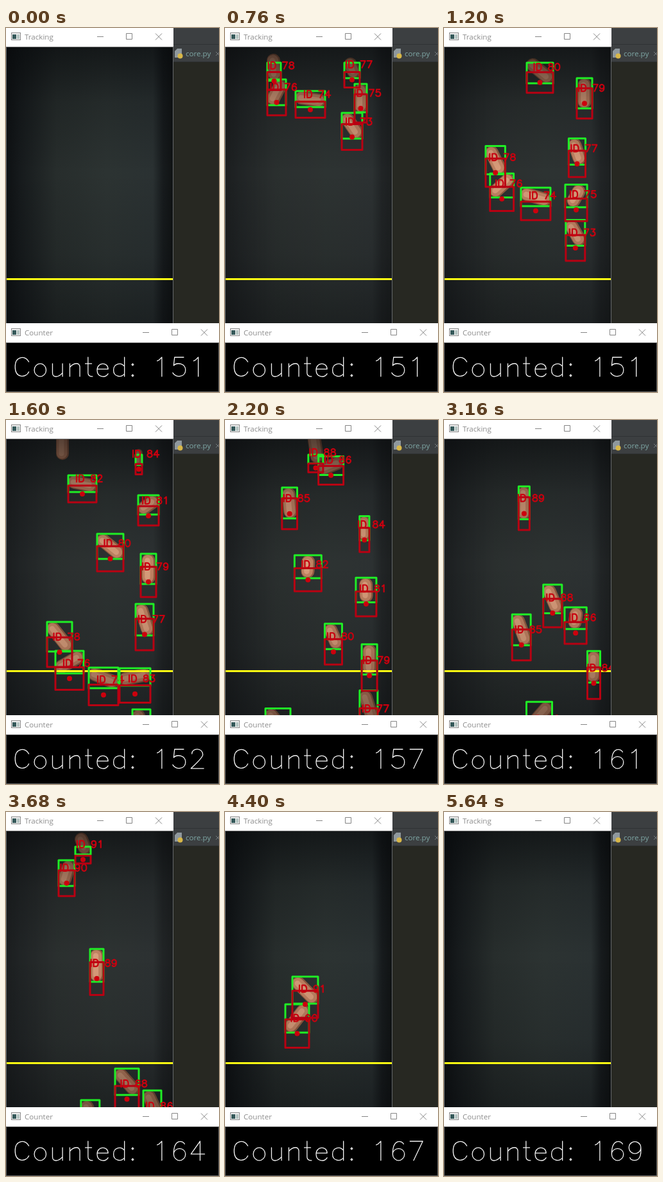
An HTML page for the animation above (5.68 s loop, 332 px wide and 566 px high).

```html
<!DOCTYPE html>
<html lang="en">
<head>
<meta charset="utf-8">
<title>Belt counter</title>
<style>
html, body { margin: 0; width: 100%; height: 100%; overflow: hidden; background: #272822; }
svg { display: block; width: 332px; height: 566px; }
text { font: 11.6px "Open Sans", "Noto Sans", sans-serif; fill: #8c8c8c; }
.stroke path { fill: none; vector-effect: non-scaling-stroke; stroke-linecap: round; stroke-linejoin: round; }
#count path { stroke: #f4f4f4; stroke-width: 1.3; }
#marks path { stroke: #c8000f; stroke-width: 2.2; }
#marks rect { fill: none; stroke-width: 3; stroke-linejoin: round; }
#fingers line { stroke-linecap: round; }
.buttons { fill: none; stroke: #858585; }
</style>
</head>
<body>
<svg viewBox="0 0 332 566">
  <defs>
    <clipPath id="view"><rect x="1" y="30" width="259" height="429"/></clipPath>
    <linearGradient id="across">
      <stop offset="0" stop-color="#0e1113"/>
      <stop offset=".08" stop-color="#161a1c"/>
      <stop offset=".3" stop-color="#272d2c"/>
      <stop offset=".6" stop-color="#2c3332"/>
      <stop offset=".88" stop-color="#2a3132"/>
      <stop offset=".94" stop-color="#171b1d"/>
      <stop offset="1" stop-color="#101314"/>
    </linearGradient>
    <linearGradient id="down" x2="0" y2="1">
      <stop offset="0" stop-color="#06080a" stop-opacity=".62"/>
      <stop offset=".2" stop-color="#06080a" stop-opacity=".2"/>
      <stop offset=".45" stop-color="#06080a" stop-opacity="0"/>
      <stop offset=".75" stop-color="#06080a" stop-opacity=".12"/>
      <stop offset="1" stop-color="#06080a" stop-opacity=".4"/>
    </linearGradient>
  </defs>

  <!-- editor -->
  <rect x="260" width="72" height="460" fill="#272822"/>
  <rect x="260" width="72" height="53" fill="#3c3f41"/>
  <path d="M260 25.5h72M260 52.5h72" stroke="#303335"/>
  <path d="M267 32h7v14h-11v-10z" fill="#8f989d"/>
  <circle cx="271.5" cy="43.5" r="4" fill="#d8b748"/>
  <text x="280" y="44" style="fill:#7fa8a6">core.py</text>
  <path d="M327 37l6 6m0-6l-6 6" stroke="#73787b"/>

  <!-- camera view -->
  <g clip-path="url(#view)">
    <rect x="1" y="30" width="259" height="429" fill="url(#across)"/>
    <rect id="glow" x="1" y="30" width="259" height="429" fill="#303234"/>
    <g id="fingers"></g>
    <rect x="1" y="30" width="259" height="429" fill="url(#down)"/>
    <path d="M1 390.5h259" stroke="#ffff12" stroke-width="3"/>
    <g id="marks" class="stroke"></g>
  </g>
  <path d="M.5 29v430M260.5 29v430" stroke="#65696b"/>

  <!-- window frames -->
  <rect width="261" height="29" fill="#fff"/>
  <path d="M0 29.5h261" stroke="#777"/>
  <rect y="459" width="332" height="107" fill="#fff"/>
  <rect x="1" y="489" width="330.5" height="76.5" fill="#000"/>
  <path d="M0 489.5h332M.5 489v77M331.5 489v77M0 565.5h332" stroke="#606060"/>
  <g id="bars"></g>
  <g id="count" class="stroke" role="img" transform="translate(10 512)"></g>
</svg>
<script>
const LOOP = 5680, STEP = 40;
const EXIT = 442, DETECT = 54, FLOOR = 459;
const $ = id => document.getElementById(id);
const mix = (a, b, u) => a + (b - a) * u;
const clamp = (v, lo, hi) => Math.min(hi, Math.max(lo, v));

// Single-stroke lettering: advance width and path, capital height 21
const glyphs = {
  ' ': [16, ''],
  0: [20, 'M3 9v3a7 9 0 0 0 14 0V9A7 9 0 0 0 3 9'],
  1: [20, 'M6 4l2-1 3-3v21'],
  2: [20, 'M4 5C4-2 16-2 16 6q0 3-13 15h14'],
  3: [20, 'M5 0h11l-6 8c9 0 9 13-1 13q-5 0-6-4'],
  4: [20, 'M13 21V0L3 14h15'],
  5: [20, 'M15 0H5L4 9c4-4 13-2 13 5 0 8-11 9-14 3'],
  6: [20, 'M16 3C14-1 4-3 4 14a6.5 7 0 0 0 13 0a6.5 6 0 0 0-13 0'],
  7: [20, 'M3 0h14L7 21'],
  8: [20, 'M10 9a6 4.5 0 1 1 .1 0a7 6 0 1 1-.1 0'],
  9: [20, 'M16 7a6.5 6.5 0 1 1 0-.1q1 14-7 14-4 0-5-3'],
  C: [21, 'M18 5C15-2 3-2 3 10.5S15 23 18 16'],
  D: [21, 'M4 0v21h7c9 0 9-21 0-21z'],
  I: [8, 'M4 0v21'],
  o: [19, 'M3 14a6.5 7 0 0 0 13 0a6.5 7 0 0 0-13 0'],
  u: [19, 'M4 7v10c0 6 7 5 11 0M15 7v14'],
  n: [19, 'M4 7v14M4 11c4-5 11-6 11 0v10'],
  t: [12, 'M5 0v17q0 4 5 4M2 7h7'],
  e: [18, 'M3 13h12c0-8-12-8-12 1 0 8 9 9 12 4'],
  d: [19, 'M15 0v21M15 10c-4-5-12-3-12 4s8 9 12 4'],
  ':': [10, 'M5 7l-1 1 1 1 1-1zM5 19l-1 1 1 1 1-1z']
};

function lettering(text, scale, x = 0, y = 0) {
  return [...text].map(ch => {
    const [width, d] = glyphs[ch];
    const path = `<path transform="translate(${x} ${y}) scale(${scale})" d="${d}"/>`;
    x += width * scale;
    return d && path;
  }).join('');
}

// Distance travelled by the belt
const belt = [[0, 0], [760, 247], [1600, 520], [2760, 780], [3680, 1038], [4400, 1295], [LOOP, 1720]];
function travel(t) {
  const i = belt.findIndex(p => p[0] > t);
  const [a, b] = [belt[i - 1], belt[i]] ;
  return mix(a[1], b[1], (t - a[0]) / (b[0] - a[0]));
}

// Each finger passes two boxes [x, y, w, h, lean]
const fingers = [];
function batch(t0, t1, rows) {
  const s0 = travel(t0), s1 = travel(t1);
  for (const [id, from, to] of rows) fingers.push({ id, from, to, s0, s1 });
}
batch(760, 1600, [
  [73, [181, 132, 34, 40, 1], [196, 450, 30, 40, 1]],
  [74, [109, 98, 48, 25, 1], [128, 385, 48, 32, 1]],
  [75, [201, 87, 21, 44, 0], [176, 386, 50, 27, -1]],
  [76, [65, 80, 31, 40, -1], [76, 359, 46, 35, -1]],
  [77, [185, 46, 26, 32, 1], [201, 286, 30, 49, 1]],
  [78, [65, 40, 23, 42, 1], [63, 314, 41, 46, 1]]
]);
batch(1600, 2760, [
  [79, [209, 208, 26, 47, 0], [215, 480, 26, 47, 0]],
  [80, [141, 177, 43, 39, 1], [167, 447, 16, 40, 1]],
  [81, [205, 117, 34, 30, -1], [201, 365, 34, 46, 1]],
  [82, [96, 86, 46, 26, 1], [118, 326, 42, 45, -1]],
  [84, [201, 45, 12, 25, 0], [216, 247, 22, 49, -1]],
  [85, [78, 14, 20, 48, 0], [97, 190, 31, 48, 1]]
]);
batch(2760, 3680, [
  [86, [167, 182, 41, 29, -1], [213, 433, 30, 40, 1]],
  [88, [142, 146, 25, 47, 1], [169, 399, 39, 41, 1]],
  [89, [104, 19, 16, 51, 0], [130, 213, 23, 51, 0]]
]);
batch(3680, 4400, [
  [90, [81, 75, 27, 40, -1], [93, 299, 39, 44, -1]],
  [91, [107, 32, 26, 34, 1], [104, 256, 42, 42, 1]]
]);

function pose({ from, to, s0, s1 }, s) {
  const u = (s - s0) / (s1 - s0), k = clamp(u, 0, 1);
  const [, , w, h, lean] = from.map((v, i) => mix(v, to[i], k));
  const y = mix(from[1], to[1], k) + Math.min(0, s - s0) + Math.max(0, s - s1);
  return { x: mix(from[0], to[0], u), y, w, h, lean };
}

function finger({ x, y, w, h, lean }) {
  const r = Math.min(10.5, w / 2, h / 2), cx = x + w / 2, dx = lean * (w / 2 - r);
  const line = (ox, width, color) =>
    `<line x1="${cx - dx + ox}" y1="${y + r}" x2="${cx + dx + ox}" y2="${y + h - r}" stroke="${color}" stroke-width="${width}"/>`;
  return line(0, 2 * r, '#8f5a40') + line(-.8, 1.65 * r, '#c08262') + line(-1.6, .8 * r, '#d89c7a');
}

const frame = (x, y, w, h, color) =>
  `<rect x="${x}" y="${y}" width="${w}" height="${h}" stroke="${color}"/>`;

function marks({ x, y, w, h }, id) {
  const bottom = y + h, top = Math.max(y, DETECT);
  if (bottom < 66 || y > 450) return '';
  const green = frame(x + 1, top, w - 2, Math.min(bottom, FLOOR + 9) - top, '#1fee25');
  if (y > EXIT) return green;
  const drop = 13 + .035 * y, cx = x + w / 2, cy = (top + bottom) / 2 + drop;
  return green + frame(x + 1, top + drop, w - 2, bottom - top, '#b80012') +
    `<circle cx="${cx}" cy="${cy}" r="4" fill="#cc000d"/>` +
    lettering('ID ' + id, .51, cx - 11, cy - 29.5);
}

function bar(title, y, x) {
  return `<rect x="8.5" y="${y + 7.5}" width="14" height="11" fill="#f2f2f2" stroke="#8a8a8a"/>
    <rect x="10" y="${y + 10}" width="6" height="7" fill="#35595a"/>
    <rect x="17" y="${y + 10}" width="4" height="7" fill="#b5c5c2"/>
    <text x="29" y="${y + 18}">${title}</text>
    <path class="buttons" d="M${x} ${y + 13.5}h10m35.5-5h9v9h-9zm45.5 0l10 10m0-10l-10 10"/>`;
}
$('bars').innerHTML = bar('Tracking', 0, 142) + bar('Counter', 460, 213);

let shown;
function draw(t) {
  const s = travel(t);
  const poses = fingers.map(f => pose(f, s));
  const seen = p => p.y < FLOOR && p.y + p.h > 30;
  $('fingers').innerHTML = poses.filter(seen).map(finger).join('');
  // The tracker loses 75 as it turns and picks it up again as 83
  const label = id => id === 75 && t >= 1480 ? 83 : id;
  $('marks').innerHTML = poses.map((p, i) => seen(p) ? marks(p, label(fingers[i].id)) : '').join('');
  $('glow').setAttribute('opacity', .4 * clamp((t - 250) / 400, 0, 1) * clamp((4300 - t) / 500, 0, 1));

  const total = 151 + poses.filter(p => p.y > EXIT).length + (t >= 1900 ? 1 : 0);
  if (total !== shown) {
    shown = total;
    const text = 'Counted: ' + total;
    $('count').innerHTML = lettering(text, 1.42);
    $('count').setAttribute('aria-label', text);
  }
}

const start = performance.now();
function tick() {
  const t = (performance.now() - start) % LOOP;
  draw(Math.floor(t / STEP) * STEP);
  requestAnimationFrame(tick);
}
tick();
</script>
</body>
</html>
```
